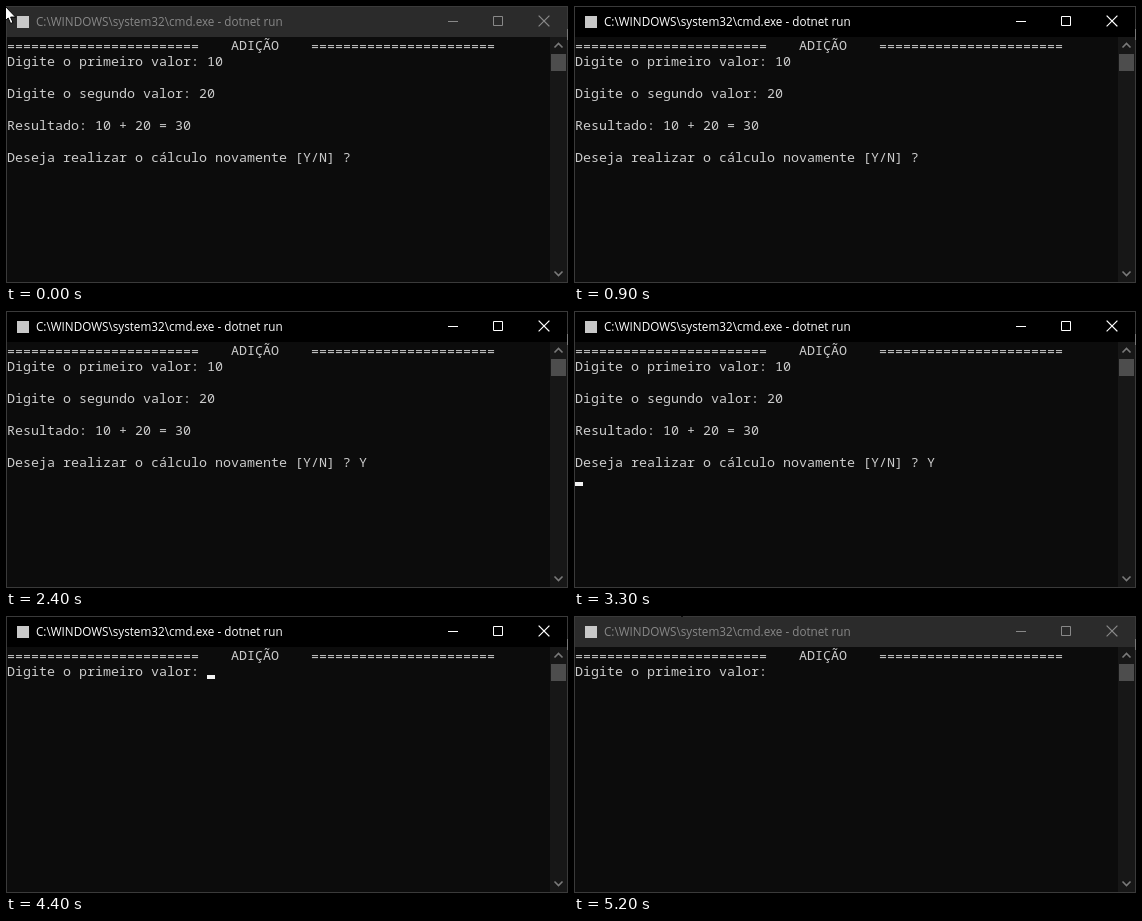
Animation, 562 px wide and 277 px high, one loop 5300 ms. Source, as an HTML page:

```html
<!DOCTYPE html>
<html lang="pt">
<head>
<meta charset="utf-8">
<title>Console</title>
<style>
html, body { margin: 0; width: 100%; height: 100%; overflow: hidden; background: #0c0c0c; }
svg { display: block; width: 562px; height: 277px; }
text { white-space: pre; }
.console text {
  font: 13.3333px "Noto Sans Mono", "Liberation Mono", monospace;
  fill: #ccc;
}
.title { font: 11.7px "Open Sans", "Noto Sans", sans-serif; fill: currentColor; }
.buttons { fill: none; stroke: currentColor; }
.scroll { fill: none; stroke: #7a7a7a; stroke-width: 1.6; }

/* 5300 ms loop, every change is a hard cut */
.bar, .fill, .answers, .reply, .caret, .mouse, .speck { animation: 5300ms step-end infinite; }
.bar { animation-name: focus; }
.fill { animation-name: fill; }
.answers { animation-name: answers; }
.reply { animation-name: reply; }
.caret { animation-name: caret; }
.mouse { animation-name: mouse; }
.speck { animation-name: speck; }

@keyframes focus {
  0%, 98.113% { color: #888; }
  16.981% { color: #fff; }
  100% { color: #888; }
}
@keyframes fill {
  0%, 98.113% { fill: #2b2b2b; }
  16.981% { fill: #000; }
  100% { fill: #2b2b2b; }
}
@keyframes answers {
  0% { opacity: 1; }
  64.15%, 100% { opacity: 0; }
}
@keyframes reply {
  0% { opacity: 0; }
  39.622% { opacity: 1; }
  64.15%, 100% { opacity: 0; }
}
@keyframes caret {
  0%      { opacity: 0; transform: translate(353px, 155px); }
  26.415% { opacity: 1; transform: translate(353px, 155px); }
  35.849% { opacity: 0; transform: translate(353px, 155px); }
  39.622% { opacity: 1; transform: translate(361px, 155px); }
  45.283% { opacity: 0; transform: translate(361px, 155px); }
  54.716% { opacity: 1; transform: translate(361px, 155px); }
  62.264% { opacity: 1; transform: translate(1px, 171px); }
  64.15%  { opacity: 1; transform: translate(201px, 59px); }
  73.584% { opacity: 0; transform: translate(201px, 59px); }
  83.018% { opacity: 1; transform: translate(201px, 59px); }
  92.452%, 100% { opacity: 0; transform: translate(201px, 59px); }
}
@keyframes mouse {
  0%     { opacity: 1; transform: translate(-2px, -1px); }
  1.886% { opacity: 1; transform: translate(-6px, 23px); }
  3.773%, 100% { opacity: 0; transform: translate(-6px, 23px); }
}
@keyframes speck {
  0% { opacity: 0; }
  94.339%, 100% { opacity: 1; }
}
</style>
</head>
<body>
<svg viewBox="0 0 562 277">
  <rect width="562" height="277" fill="#0c0c0c"/>

  <g class="bar">
    <rect class="fill" x="1" y="1" width="560" height="30"/>
    <rect x="11" y="10" width="12" height="12" fill="#c8c8c8"/>
    <text class="title" x="30" y="20">C:\WINDOWS\system32\cmd.exe - dotnet run</text>
    <g class="buttons">
      <path d="M442 15.5h10M487.5 10.5h9v9h-9z" stroke-linejoin="bevel"/>
      <path d="M533 10l10 10m0-10l-10 10" stroke-width="1.1" stroke-linecap="square"/>
    </g>
  </g>

  <rect x="544" y="31" width="17" height="245" fill="#171717"/>
  <rect x="545" y="48" width="15" height="17" fill="#4d4d4d"/>
  <path class="scroll" d="M548.5 41.5l4-4 4 4M548.5 265.5l4 4 4-4"/>

  <rect x=".5" y=".5" width="561" height="276" fill="none" stroke="#3a3a3a"/>
  <path d="M561.5 23v11" stroke="#777"/>
  <rect class="speck" x="107" width="2" height="1" fill="#0c0c0c"/>

  <g class="console">
    <text x="1" y="45">========================</text>
    <text x="225" y="44">ADIÇÃO</text>
    <text x="305" y="45">=======================</text>
    <text x="1" y="60">Digite o primeiro valor:</text>
    <g class="answers">
      <text x="201" y="60">10</text>
      <text x="1" y="92">Digite o segundo valor: 20</text>
      <text x="1" y="124">Resultado: 10 + 20 = 30</text>
      <text x="1" y="156">Deseja realizar o cálculo novamente [Y/N] ?</text>
    </g>
    <text class="reply" x="353" y="156">Y</text>
    <rect class="caret" width="8" height="4" fill="#f2f2f2"/>
  </g>

  <path class="mouse" d="M.5 .5v16l3.7-3.5 2.4 5.5 2.4-1-2.4-5.4h5z" fill="#fff" stroke="#000"/>
</svg>
</body>
</html>
```
